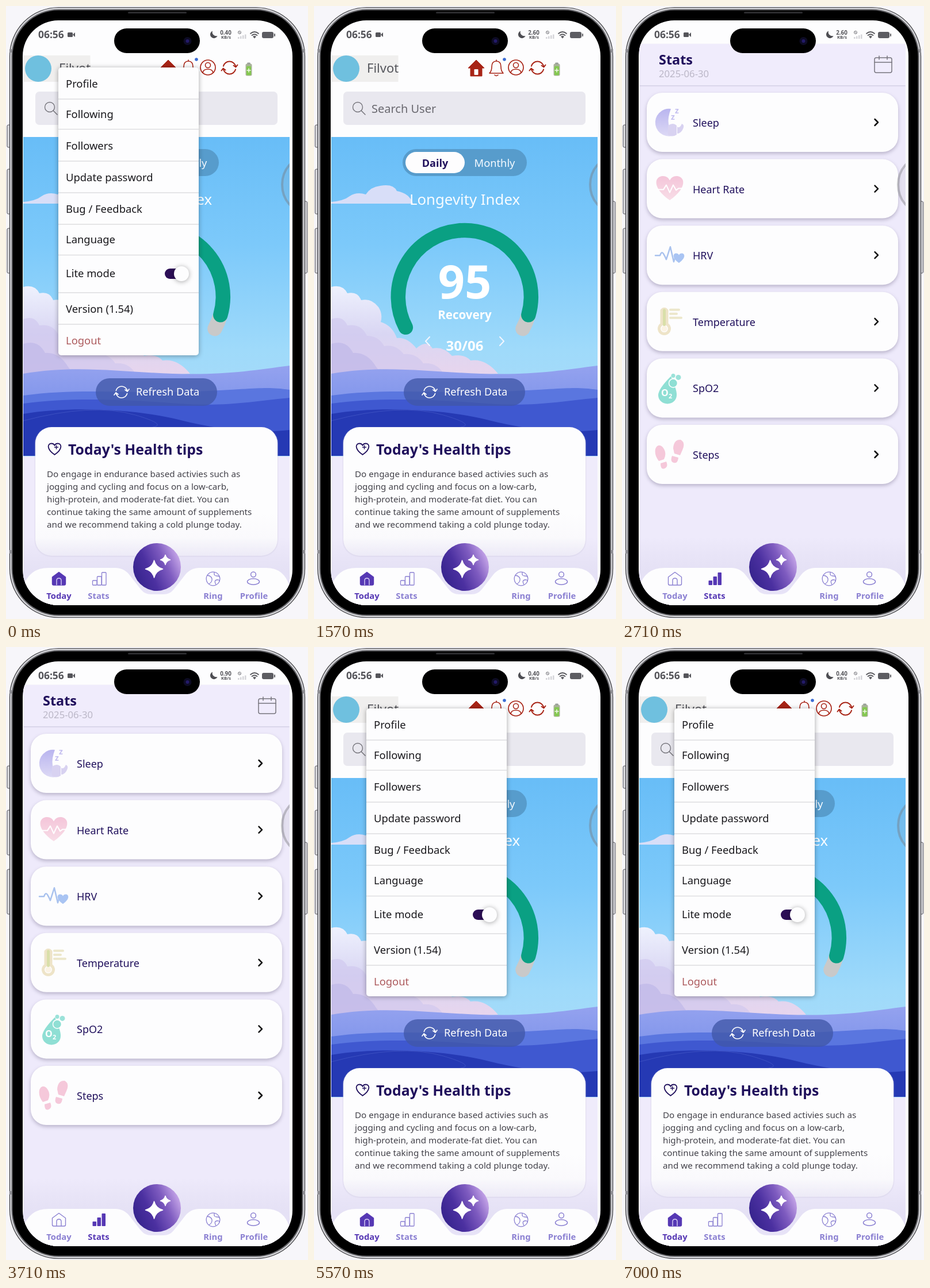
Write an HTML page that moves like this. It is 525x1067 px and loops after 7.14 s.

```html
<!DOCTYPE html>
<html lang="en">
<head>
<meta charset="utf-8">
<style>
html, body { margin: 0; width: 100%; height: 100%; overflow: hidden; background: #f7f6fa }
svg { display: block; width: 100vw; height: 100vh; font-family: "Noto Sans", "Open Sans", sans-serif }
.card { filter: drop-shadow(0 3px 3px rgba(50, 40, 80, .28)) }
.menu { filter: drop-shadow(0 1px 4px rgba(0, 0, 0, .35)) }
.flat { filter: drop-shadow(0 1px 1px #c9c5dc) }
</style>
</head>
<body>
<svg id="stage" viewBox="0 0 525 1067"></svg>
<script>
const LOOP = 7140, INK = '#20105c', WHITE = '#fdfdfe', LILAC = '#8b80d2', VIOLET = '#5638b4', RED = '#a82416';

const text = (x, y, s, size, fill = INK, weight = 400, anchor = 'start') =>
  `<text x="${x}" y="${y}" font-size="${size}" fill="${fill}" font-weight="${weight}" text-anchor="${anchor}">${s}</text>`;
const rect = (x, y, w, h, r, fill, extra = '') =>
  `<rect x="${x}" y="${y}" width="${w}" height="${h}" rx="${r}" fill="${fill}" ${extra}/>`;
const disc = (x, y, r, fill, extra = '') => `<circle cx="${x}" cy="${y}" r="${r}" fill="${fill}" ${extra}/>`;
const shape = (d, fill, extra = '') => `<path d="${d}" fill="${fill}" ${extra}/>`;
const line = (d, color, w = 1.5, extra = '') =>
  `<path d="${d}" fill="none" stroke="${color}" stroke-width="${w}" stroke-linecap="round" stroke-linejoin="round" ${extra}/>`;
const at = (x, y, body, scale = 1) => `<g transform="translate(${x} ${y}) scale(${scale})">${body}</g>`;
const gradient = (id, colors, dir = 'x2="0" y2="1"') =>
  `<linearGradient id="${id}" ${dir}>${colors.map((c, i) =>
    `<stop offset="${i / (colors.length - 1)}" stop-color="${c}"/>`).join('')}</linearGradient>`;
const star = (x, y, r) =>
  shape(`M${x} ${y - r}Q${x + r * .2} ${y - r * .2} ${x + r} ${y}Q${x + r * .2} ${y + r * .2} ${x} ${y + r}` +
    `Q${x - r * .2} ${y + r * .2} ${x - r} ${y}Q${x - r * .2} ${y - r * .2} ${x} ${y - r}Z`, '#fff',
    'stroke="#fff" stroke-width="1.5" stroke-linejoin="round"');
const polar = (deg, r, cx = 0, cy = 0) =>
  `${cx + r * Math.cos(deg * Math.PI / 180)} ${cy + r * Math.sin(deg * Math.PI / 180)}`;
const HEART = 'M0 19C-30 -2 -24 -20 -11 -20Q-3 -20 0 -13Q3 -20 11 -20C24 -20 30 -2 0 19Z';

function refresh(x, y, r, color, w) {
  const half = line(`M${polar(195, r)}A${r} ${r} 0 0 1 ${polar(350, r)}M${r + 3} -5L${r} -1L${r - 4} -4`, color, w);
  return at(x, y, half + `<g transform="rotate(180)">${half}</g>`);
}
const battery = (x, y, w, h) =>
  rect(x - w / 2, y - h / 2, w, h, 2.5, '#a9b39a') +
  rect(x - w / 4, y - h / 2 - 2, w / 2, 3, 1, '#9a9f9a') +
  rect(x - w / 2 + 1.5, y - h * .3, w - 3, h * .75, 1.5, '#84c850') +
  line(`M${x - 3} ${y + 1}h6m-3 -3v6`, '#f2fbe8', 1.5);

function nav(active) {
  const color = name => name === active ? VIOLET : LILAC;
  const tab = (name, x, icon) =>
    `<g ${name === active ? 'class="active"' : ''}>${icon(color(name), name === active)}${text(x, 1032, name, 14.8, color(name), 600, 'middle')}</g>`;
  const home = 'M80.5 994L92 985.5L103.5 994V1005.5Q103.5 1008 101 1008H83Q80.5 1008 80.5 1005.5Z';
  return rect(30, 925, 463, 118, 0, 'url(#haze)') +
    shape('M29 1043V1015Q38 978 74 978H190Q206 978 216 992L234 1015Q241 1024 252 1024H274Q285 1024 292 1015L310 992Q320 978 336 978H452Q486 978 494 1015V1043Z', WHITE) +
    tab('Today', 92, (c, on) => line(home, c, 1.4, on ? `style="fill:${c}"` : '') +
      line('M88 1007.5V1000Q88 996 92 996T96 1000V1007.5', on ? '#d9d0f6' : c, 1.4)) +
    tab('Stats', 161, (c, on) => [0, 1, 2].map(i =>
      rect(150.5 + i * 8, 1000 - i * 7, on ? 6.5 : 7.5, 8 + i * 7, 1, on ? c : 'none', on ? '' : `stroke="${c}" stroke-width="1.3"`)).join('')) +
    tab('Ring', 360, (c, on) => disc(360, 997, 11.8, on ? c : 'none', `stroke="${c}" stroke-width="1.3"`) +
      line('M350 991Q357 992 358 997T353 1006M362 986Q361 992 366 992T371 994M365 1007Q361 1000 366 999T371 1001', on ? '#eee8ff' : c, 1.3)) +
    tab('Profile', 431, c => disc(430, 989.5, 4.4, 'none', `stroke="${c}" stroke-width="1.5"`) +
      `<ellipse cx="430" cy="1002" rx="10.5" ry="5.2" fill="none" stroke="${c}" stroke-width="1.5"/>`) +
    disc(262.5, 976.5, 41.5, 'url(#orb)') + star(257.5, 980, 15) + star(277, 964, 8.5);
}

function scenery() {
  return rect(30, 228, 463, 556, 0, 'url(#sky)') +
    shape('M30 344V341Q52 339 62 331Q74 323 90 328Q98 315 115 313Q138 309 144 322Q166 326 172 344Z', '#d8def8') +
    shape('M30 489Q50 484 58 500Q76 496 82 512Q100 508 112 524Q120 536 116 550Q136 556 144 578Q162 576 178 596Q195 580 206 596Q225 592 240 609Q262 605 272 617Q298 613 320 640L30 655Z', 'url(#cloud)') +
    shape('M30 545Q50 538 58 556Q82 552 92 574Q112 574 122 592Q142 588 156 606Q178 604 190 622Q215 620 226 642H30Z', '#cfc6ee', 'opacity=".6"') +
    shape('M30 588Q56 580 68 604Q92 602 108 628L120 645H30Z', '#bdb6e8', 'opacity=".6"') +
    shape('M30 640C120 624 200 637 290 640S430 634 493 626V783H30Z', 'url(#hill)') +
    shape('M30 678C130 664 220 676 330 671S450 662 493 668V783H30Z', '#5a76df') +
    shape('M30 692C120 680 220 686 300 692S430 688 493 682V783H30Z', '#3f58d0') +
    shape('M30 710C110 696 230 702 300 720S430 744 493 738V783H30Z', '#2539b4') +
    line('M30 722Q150 690 225 712T228 735', '#4c60cc', 1, 'opacity=".6"');
}

function today() {
  const arc = (from, to, color) =>
    line(`M${polar(from, 115.5, 261.8, 506)}A115.5 115.5 0 ${to - from > 180 ? 1 : 0} 1 ${polar(to, 115.5, 261.8, 506)}`, color, 25.5);
  const tips = ['Do engage in endurance based activies such as', 'jogging and cycling and focus on a low-carb,',
    'high-protein, and moderate-fat diet. You can', 'continue taking the same amount of supplements',
    'and we recommend taking a cold plunge today.'];
  return rect(30, 228, 463, 815, 0, '#efebfb') +
    rect(30, 86, 116.5, 46, 0, '#f0efee') + disc(56, 109, 23, '#6fc0df') +
    text(92, 116, 'Filvot', 22, '#55565c') +
    shape('M268 108L282 94L296 108H292V122H272V108Z', RED, `stroke="${RED}" stroke-linejoin="round"`) +
    rect(278.5, 110, 7, 10, 1, '#fff') +
    line('M305 117Q309 113 309 106Q309 96 317 96T325 106Q325 113 329 117ZM314 120Q317 123 320 120M317 96V94', RED, 1.6) +
    disc(331, 93, 2.8, '#3b6cd4') +
    disc(351, 107, 13, 'none', `stroke="${RED}" stroke-width="1.7"`) +
    disc(351, 103, 4.5, 'none', `stroke="${RED}" stroke-width="1.6"`) + line('M342 116Q343 110 351 110T360 116', RED, 1.6) +
    refresh(388.5, 107.5, 11, RED, 2) + battery(422, 111, 11, 21) +
    rect(51, 149, 421, 58, 7, '#e9e8ef') +
    disc(76, 176, 8.5, 'none', 'stroke="#77767d" stroke-width="1.4"') + line('M82 182L89 189', '#77767d') +
    text(100, 186, 'Search User', 20, '#69686f') +
    scenery() +
    rect(154, 249, 216, 47, 23.5, '#5598c6', 'opacity=".88"') + rect(159, 254, 103, 37, 18.5, WHITE) +
    text(210.5, 280, 'Daily', 18, INK, 600, 'middle') + text(314, 280, 'Monthly', 18.3, '#f4faff', 500, 'middle') +
    text(262, 346, 'Longevity Index', 25.8, '#f8fcff', 400, 'middle') +
    arc(16, 28.8, '#c9c9c9') + arc(152.5, 376, '#0aa083') +
    text(262, 509, '95', 81, '#fff', 600, 'middle') + text(262, 545, 'Recovery', 20.6, '#fff', 600, 'middle') +
    text(262, 600, '30/06', 24, '#fff', 600, 'middle') +
    line('M201 576L194 583.5L201 591M323 576L330 583.5L323 591', '#f2f6ff', 2) +
    rect(156, 648, 211, 48, 24, '#4058a8', 'opacity=".78"') + refresh(201, 672, 10, '#fff', 1.7) +
    text(226, 678, 'Refresh Data', 18.2, '#fff', 500) +
    rect(51, 733, 421, 224, 28, 'url(#paper)', 'class="flat"') +
    at(84.5, 771.5, line(HEART, INK, 3.6), .5) + line('M84.5 768h6m-3 -3v6', INK, 1.5) +
    text(108, 781, "Today's Health tips", 24.8, INK, 600) +
    tips.map((s, i) => text(71, 820 + i * 21.9, s, 15.2, '#424149')).join('') +
    rect(30, 970, 463, 40, 30, '#f0edfb') + nav('Today');
}

const statIcons = [
  shape('M2 -23A24 24 0 1 0 10 22Q-10 8 2 -23Z', 'url(#moon)') +
    shape('M-3 6Q6 0 12 6V22Q4 27 -3 22ZM13 8Q17 12 21 3Q27 5 22 14Q18 20 13 20Z', '#d8d2f1') +
    text(9, -15, 'z', 14, '#c4bff0', 700) + text(2, -4, 'z', 14, '#c4bff0', 700),
  shape(HEART, 'url(#pink)', 'transform="scale(1.08)"') + line('M-22 2H-11L-6 -6L0 7L6 -6L11 3L15 0H22', '#fff', 2),
  line('M-25 1H-17Q-14 -7 -11 -2T-6 8L1 -14L7 12L11 -1', '#a9c2ee', 2.5) + at(16, 6, shape(HEART, '#a9c4f3'), .43),
  line('M-14 -19V5A9 9 0 1 0 -5 5V-19Q-9.500 -24 -14 -19Z', '#eee4c8', 5) +
    line('M-9.500 -19V6', '#d9dfaa', 5) + disc(-9.5, 13, 5, '#fbf3e4') + line('M1 -20H16M1 -13H12M1 -6H20', '#ece7cb', 4),
  shape('M2 -20Q-20 2 -20 13A16 15 0 0 0 12 13Q13 5 2 -20Z', '#8fdfd4') + disc(6, -8, 7.5, '#8fdfd4', 'stroke="#fff" stroke-width="1.5"') +
    disc(6, -21, 3.5, '#9be2d9') + disc(15, -18, 4.5, '#9be2d9') + text(-15, 15, 'O', 16, '#fff', 700) + text(-2, 19, '2', 11, '#fff', 700),
  shape('M-25 -9Q-21 -19 -13 -13Q-4 -3 -10 9L-19 12Q-27 2 -25 -9ZM-16 16L-6 13Q-2 22 -9 25T-16 16ZM6 -10Q7 -26 19 -25Q28 -20 22 -7L18 2L8 -1ZM4 3L15 6Q14 17 7 15T4 3Z', '#f5c8da'),
];

function stats() {
  return rect(30, 66, 463, 977, 0, '#eeeafb') + rect(30, 66, 463, 72, 0, '#f0ecfc', 'class="flat"') +
    text(64, 102, 'Stats', 23.4, INK, 700) + text(64, 124, '2025-06-30', 16.7, '#bbb7c7') +
    rect(439, 90, 30, 26, 3, 'none', 'stroke="#77757e" stroke-width="1.5"') + line('M439 98H469M447 87V93M461 87V93', '#77757e') +
    ['Sleep', 'Heart Rate', 'HRV', 'Temperature', 'SpO2', 'Steps'].map((name, i) => at(0, i * 115.6,
      rect(43, 151, 437, 103, 27, WHITE, 'class="card"') + at(83, 202, statIcons[i]) +
      text(123, 210, name, 18, INK, 500) + line('M439.5 197L445 202.5L439.5 208', '#111', 2.5))).join('') +
    nav('Stats');
}

function ring() {
  const teeth = [...Array(73).keys()].map(i =>
    polar(i * 5, 14.8 + 2 * Math.tanh(2.5 * Math.cos(i * Math.PI / 6)))).join('L');
  const rows = [['Set Timezone'], ['Backup Data', '2024-11-05 19:12 PM'], ['Restore Data', '2024-10-29 18:00 PM'],
    ['Factory Reset'], ['Unpair'], ['Revoke Ring for next user']];
  return rect(30, 138, 463, 905, 0, '#eeeafb') + rect(30, 66, 463, 72, 0, WHITE, 'class="card"') +
    text(262, 113, 'Ring', 25.4, '#2b0f56', 500, 'middle') +
    rect(43, 155, 437, 144, 27, WHITE) +
    text(69, 206, '2301B 1346', 23.7, '#260a50', 600) + text(69, 225, 'E2:B0:90:00:13:46', 13.2, '#8d8c93') +
    text(69, 249, 'Last Sync', 15.9, '#8d8c93') + text(69, 270, '2025-06-29 10:18 AM', 15.9, '#8d8c93') +
    battery(383, 229, 15, 24) + text(404, 237, '98%', 24.5, '#260a50', 600) +
    rect(30, 316.5, 463, 2, 0, '#d2cddd') +
    rows.map(([name, note], i) => at(0, i * 73.2,
      rect(43, 333, 437, 55, 27.5, WHITE, 'class="card"') +
      at(82.5, 360.5, line(`M${teeth}Z`, '#111', 2.8) + disc(0, 0, 5.5, 'none', 'stroke="#111" stroke-width="2.8"')) +
      text(122, note ? 360 : 369, name, 21, INK, 600) + (note ? text(122, 381, note, 15.6, '#8f8e96') : ''))).join('') +
    nav('Ring');
}

function menu() {
  const items = [['Profile', 142], ['Following', 195], ['Followers', 250], ['Update password', 305], ['Bug / Feedback', 360],
    ['Language', 413], ['Lite mode', 472], ['Version (1.54)', 534], ['Logout', 589]];
  return rect(91, 107, 244, 501, 5, WHITE, 'class="menu"') +
    [162, 214.5, 270, 325, 380, 433.5, 499, 554].map(y => rect(91, y - .7, 244, 1.4, 0, '#dcdcdf')).join('') +
    items.map(([s, y]) => text(104, y, s, 18.4, s === 'Logout' ? '#ad5b5e' : '#19181c')).join('') +
    rect(276, 457, 36, 18, 9, '#2c0e56') + disc(305, 466, 13, WHITE, 'class="menu"');
}

const status = () => text(56, 56, '06:56', 17.4, '#55555a', 600) +
  rect(107, 46, 9, 8, 1.5, '#55555a') + shape('M116 50L120 46V54Z', '#55555a') +
  shape('M359 43.5A6.5 6.5 0 1 0 367.5 52A6.8 6.8 0 0 1 359 43.5Z', '#4d4d52') +
  '<g id="speed">' + text(382, 49.5, '0.40', 9.8, '#55555a', 600, 'middle') + '</g>' + text(382.5, 57, 'KB/s', 7.6, '#55555a', 600, 'middle') +
  disc(406, 46, 2.5, 'none', 'stroke="#77777c"') + line('M404.5 44.5L407.5 47.5', '#77777c', 1) +
  [0, 1, 2, 3].map(i => rect(403 + i * 4, 54 - i * 1.5, 2.5, 3 + i * 1.5, 0, '#d5d5d9')).join('') +
  line('M425 48Q432 42 439 48M427.5 51Q432 47.5 436.5 51', '#5a5a5f', 1.8) + shape('M429 53Q432 51 435 53L432 56.5Z', '#5a5a5f') +
  rect(445, 45, 20, 11, 3, '#5d5d62') + rect(466, 48, 2, 5, 1, '#5d5d62');

const body = () => {
  const button = (x, y, h) => rect(x, y, 6, h, 2, '#d9d9dd', 'stroke="#55555a"');
  return button(2, 207, 39) + button(2, 284, 78) + button(2, 387, 78) + button(517.5, 340, 125) +
    rect(6.5, 2.5, 513, 1062, 85, '#d6d6da', 'stroke="#38383c" stroke-width="1.2"') +
    rect(10.5, 6.5, 505, 1054, 81, '#000', 'stroke="#66666a" stroke-width="2"') +
    rect(212, 10, 102, 3, 1.5, '#2b2b2e') +
    [75, 947].map(y => rect(6, y, 4, 6, 0, '#8f8f94') + rect(516, y, 4, 6, 0, '#8f8f94')).join('');
};

const stage = document.getElementById('stage');
const layer = (id, content) => `<g id="${id}">${content}</g>`;
stage.innerHTML = '<defs>' +
  gradient('sky', ['#68bdf7', '#7cc9fa', '#9fdafa', '#b0dcf8']) + gradient('cloud', ['#eef1fd', '#d9d6f3', '#ead5ec']) +
  gradient('hill', ['#94a2ef', '#7d93ea', '#6a84e4']) +
  gradient('orb', ['#35238c', '#4b30a0', '#7f5cc0', '#cfb0ee'], 'x1="0" y1=".7" x2="1" y2=".25"') +
  gradient('haze', ['rgba(226,222,243,0)', '#e5e1f5', '#e8e4f8']) + gradient('paper', [WHITE, WHITE, WHITE, '#f8f7fb']) +
  gradient('moon', ['#b9b5ef', '#ddd9f5']) + gradient('pink', ['#f4c5d9', '#f8dde7']) +
  '<clipPath id="screen">' + rect(29, 25, 469, 1018, 62, '#fff') + '</clipPath>' +
  '<clipPath id="view">' + rect(30, 25, 463, 1018, 0, '#fff') + '</clipPath></defs>' + body() +
  '<g clip-path="url(#screen)">' + rect(29, 25, 469, 1018, 0, WHITE) +
  '<g clip-path="url(#view)">' + layer('today', today()) + layer('stats', stats()) + layer('ring', ring()) +
  '<ellipse cx="520" cy="311" rx="40" ry="47" fill="#888" fill-opacity=".1" stroke="#77777c" stroke-opacity=".42" stroke-width="4"/></g>' +
  status() + layer('menu', menu()) +
  layer('touch', disc(348, 122, 11, '#fff', 'fill-opacity=".55" stroke="#88858f" stroke-width="1.3"')) + '</g>' +
  rect(188, 39, 149, 43, 21.5, '#000') + disc(315.5, 61, 7, '#0d0b24') + disc(315.5, 61, 3, '#231a68');

const el = id => document.getElementById(id);
const clamp = v => Math.max(0, Math.min(1, v));
const speedText = el('speed').firstChild;
const screens = { today: 5000, stats: 1600, ring: 4200 };

function draw(t) {
  const current = t < screens.stats || t >= screens.today ? 'today' : t < screens.ring ? 'stats' : 'ring';
  for (const id in screens) el(id).style.display = id === current ? '' : 'none';
  // A pressed tab dims, then recovers.
  const since = t - screens[current];
  el(current).querySelector('.active').style.opacity = since < 0 ? 1 : .45 + .55 * clamp((since - 150) / 200);
  el('menu').style.opacity = t < screens.stats ? 1 - clamp((t - 650) / 120) : clamp((t - 5450) / 120);
  el('touch').style.opacity = .5 * clamp((t - 560) / 80) * clamp((960 - t) / 90);
  speedText.textContent = t < 140 || t >= 5300 ? '0.40' : t < 3000 ? '2.60' : '0.90';
}

(function frame() {
  draw(performance.now() % LOOP);
  requestAnimationFrame(frame);
})();
</script>
</body>
</html>
```
